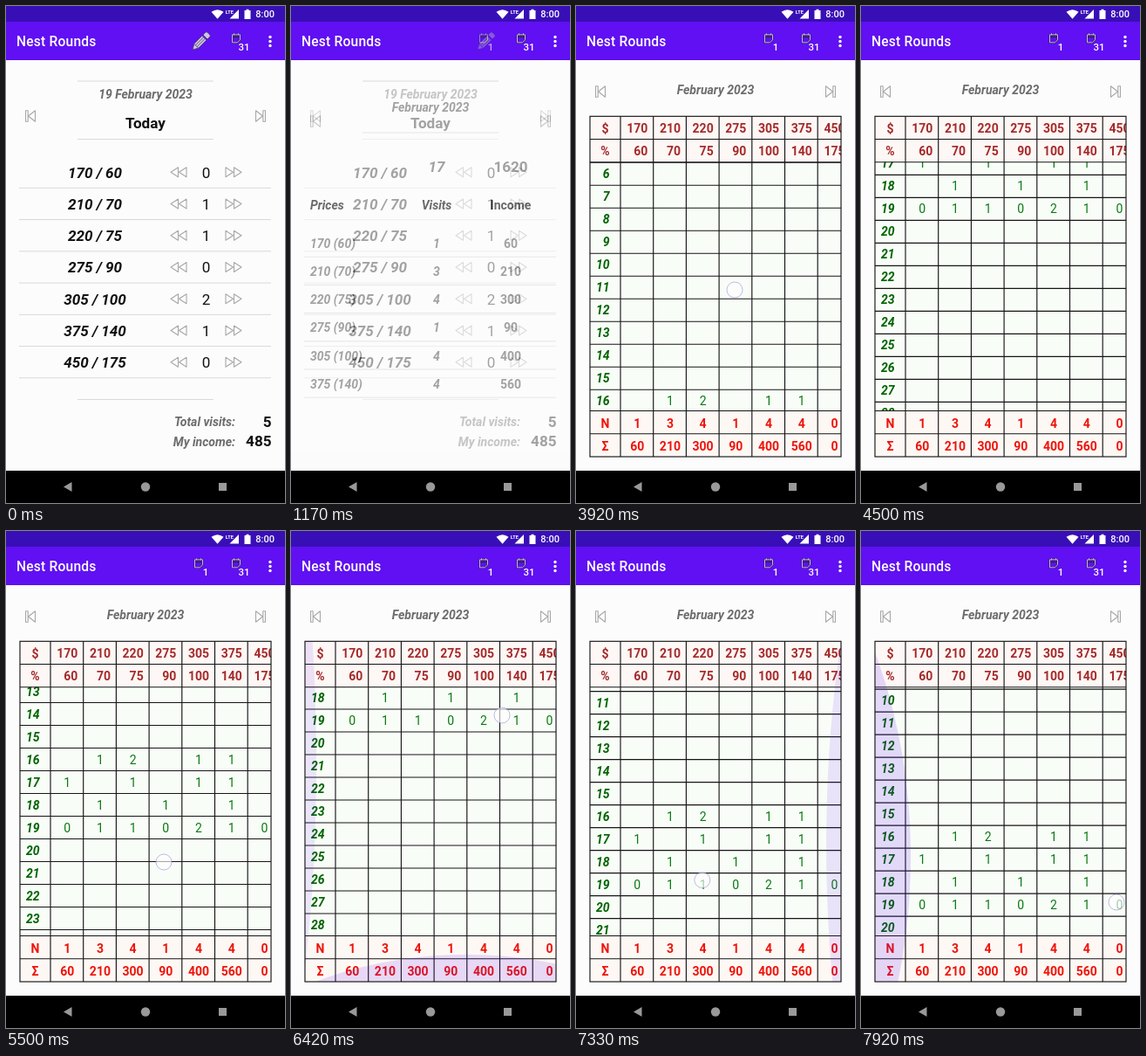
An HTML page that plays this animation: 320x569 px, repeating every 8000 ms.

```html
<!DOCTYPE html>
<html lang="en">
<head>
<meta charset="utf-8">
<title>Visit log</title>
<style>
html, body { margin: 0; width: 100%; height: 100%; overflow: hidden; background: #fcfcfc; }
svg { display: block; width: 100vw; height: 100vh; font: 14px Roboto, sans-serif; }
.b { font-weight: 700; }
.i { font-weight: 700; font-style: italic; }
.l { font-size: 17.1px; }
.m { font-weight: 500; }
.gray { fill: #6c6c6c; }
.dark { fill: #111; }
.brown { fill: #a52a2a; }
.red { fill: #ee1409; }
.green { fill: #0a7a12; }
.deep { fill: #006400; }
.white { fill: #fff; }
.rule { stroke: #d9d9d9; }
.grid { stroke: #151515; stroke-width: 1.15; }
.icon { fill: none; stroke: #a8a8a8; stroke-width: 1.1; stroke-linejoin: round; }
</style>
</head>
<body>
<svg id="stage" viewBox="0 0 320 569" preserveAspectRatio="none">
  <defs>
    <clipPath id="table"><rect x="16" y="126" width="288" height="390"/></clipPath>
    <clipPath id="cols"><rect x="51" y="126" width="253" height="390"/></clipPath>
    <clipPath id="rows"><rect x="16" y="178.5" width="288" height="285"/></clipPath>
    <g id="prev" class="icon">
      <path d="M-5.500-6.300h2.700v12.600h-2.700zM5.500-6.200V6.200L-2.500 0z"/>
    </g>
    <g id="rew" class="icon"><path d="M-.5-5.5v11L-9 0zM9-5.5v11L.5 0z"/></g>
    <g id="cal" fill="none">
      <path d="M-4.5-3.5h9v6l-3 3h-6zM-4.5-1h9M-2.5-5v2M2.5-5v2" stroke="#30244e" stroke-width="1.7"/>
      <path d="M-4.5-3.5h9v6l-3 3h-6zM-2.5-5v2M2.5-5v2" stroke="#c3b6dc"/>
    </g>
  </defs>
</svg>
<script>
const NS = 'http://www.w3.org/2000/svg';
const stage = document.getElementById('stage');

function add(parent, tag, attrs = {}, text) {
  const el = document.createElementNS(NS, tag);
  for (const k in attrs) el.setAttribute(k, attrs[k]);
  if (text !== undefined) el.textContent = text;
  return parent.appendChild(el);
}
const group = (p, attrs) => add(p, 'g', attrs);
const label = (p, x, y, str, cls, anchor = 'middle') =>
  add(p, 'text', { x, y, class: cls, 'text-anchor': anchor }, str);
const line = (p, x1, y1, x2, y2, cls) => add(p, 'line', { x1, y1, x2, y2, class: cls });
const rect = (p, x, y, width, height, fill) => add(p, 'rect', { x, y, width, height, fill });
const use = (p, id, x, y, flip) =>
  add(p, 'use', { href: '#' + id, transform: `translate(${x} ${y})${flip ? ' scale(-1 1)' : ''}` });

const prices = [170, 210, 220, 275, 305, 375, 450];
const shares = [60, 70, 75, 90, 100, 140, 175];
const visits = [1, 3, 4, 1, 4, 4, 0];
const today = [0, 1, 1, 0, 2, 1, 0];

function calendar(g, x, num) {
  use(g, 'cal', x, 36.3);
  label(g, x + (num > 9 ? 9 : 8), 51, num, 'm white').style.fontSize = '11.5px';
}
function screen(arrowY) {
  const g = group(stage);
  rect(g, 0, 62, 320, 470, '#fcfcfc');
  rect(g, 0, 18, 320, 44, '#6010f2');
  use(g, 'prev', 28, arrowY);
  use(g, 'prev', 292, arrowY, true);
  calendar(g, 264, 31);
  return g;
}

function dayScreen() {
  const g = screen(126);
  const pen = group(g, { transform: 'translate(214 50) rotate(-45)', stroke: '#4a3c68', 'stroke-width': .8 });
  add(pen, 'path', { d: 'M0 0l6-3.5h13v7h-13z', fill: '#cfc4e6' });
  add(pen, 'path', { d: 'M20.5-3.5h4q1.5 0 1.5 1.5v4q0 1.5-1.5 1.5h-4z', fill: '#cfc4e6' });
  add(pen, 'path', { d: 'M6-1.2h13M6 1.2h13M6-3.5v7', fill: 'none' });
  for (const y of [86, 152.5, 450.5]) line(g, 82, y, 238, y, 'rule');
  label(g, 160, 105.5, '19 February 2023', 'i gray');
  label(g, 160, 139.5, 'Today', 'b l dark');
  prices.forEach((p, k) => {
    const y = 190.3 + 36.25 * k;
    label(g, 102, y + 6.2, `${p} / ${shares[k]}`, 'i l dark');
    use(g, 'rew', 198, y);
    label(g, 229.5, y + 6.2, today[k], 'l dark');
    use(g, 'rew', 261, y, true);
    line(g, 15, y + 18, 304, y + 18, 'rule');
  });
  label(g, 263, 481, 'Total visits:', 'i gray', 'end');
  label(g, 304.5, 481.5, '5', 'b l dark', 'end');
  label(g, 263, 503.5, 'My income:', 'i gray', 'end');
  label(g, 304.5, 504, '485', 'b l dark', 'end');
  return g;
}

function sumScreen() {
  const g = screen(132);
  calendar(g, 221, 1);
  for (const y of [86, 145]) line(g, 82, y, 238, y, 'rule');
  label(g, 160, 121, 'February 2023', 'i gray');
  label(g, 167, 189.5, '17', 'i l gray');
  label(g, 252, 189.5, '1620', 'b l gray');
  label(g, 22, 233, 'Prices', 'i dark', 'start');
  label(g, 167, 233, 'Visits', 'i dark');
  label(g, 252, 233, 'Income', 'b dark');
  for (let k = 0; k < 6; k++) {
    const y = 276.7 + 32.2 * k;
    label(g, 22, y, `${prices[k]} (${shares[k]})`, 'i gray', 'start');
    label(g, 167, y, visits[k], 'i gray');
    label(g, 252, y, visits[k] * shares[k], 'b gray');
    line(g, 15, y + 10.5, 304, y + 10.5, 'rule');
  }
  return g;
}

const COL = 37.7, ROW = 26, MAX_Y = 444, MAX_X = 10.9;
const colX = k => 51 + COL * k;
let dayNames, dayCells, columns, glowLeft, glowRight, glowBottom;

function tableScreen() {
  const g = screen(98);
  calendar(g, 221, 1);
  label(g, 160, 101, 'February 2023', 'i gray');
  rect(g, 16, 126, 288, 53, '#fdf7f5');
  rect(g, 16, 179, 288, 285, '#f9fdf8');
  rect(g, 16, 464, 288, 52, '#fef8f5');

  const body = group(g, { 'clip-path': 'url(#rows)' });
  dayNames = group(body);
  dayCells = group(group(body, { 'clip-path': 'url(#cols)' }));
  for (let d = 1; d <= 28; d++) {
    const y = 180 + ROW * (d - 1);
    label(dayNames, 38.5, y + 18, d, 'i deep', 'end');
    line(dayNames, 16, y, 304, y, 'grid');
  }
  const log = { 16: ' 12 11 ', 17: '1 1 11 ', 18: ' 1 1 1 ', 19: today.join('') };
  for (const d in log) [...log[d]].forEach((v, k) => {
    if (v !== ' ') label(dayCells, colX(k) + 19.2, 198 + ROW * (d - 1), v, 'green');
  });

  columns = group(group(g, { 'clip-path': 'url(#cols)' }));
  prices.forEach((p, k) => {
    const x = colX(k), mid = x + 19.2;
    label(columns, x + 31.3, 145, p, 'b brown', 'end');
    label(columns, x + 31.3, 171, shares[k], 'b brown', 'end');
    label(columns, mid, 482.5, visits[k], 'b red');
    label(columns, mid, 508.5, visits[k] * shares[k], 'b red');
    if (k) line(columns, x, 126, x, 516, 'grid');
  });
  label(g, 33.5, 145, '$', 'b brown');
  label(g, 33.5, 171, '%', 'b brown');
  label(g, 33.5, 482.5, 'N', 'b red');
  label(g, 33.5, 508.5, 'Σ', 'b red');
  for (const y of [152.5, 178.7, 463.5, 489.7]) line(g, 16, y, 304, y, 'grid');
  line(g, 51, 126, 51, 516, 'grid');

  const glows = group(g, { 'clip-path': 'url(#table)', fill: '#5a10ee' });
  [glowLeft, glowRight, glowBottom] = [0, 1, 2].map(() => add(glows, 'ellipse'));
  add(g, 'rect', { x: 16, y: 126.3, width: 288, height: 389.7, fill: 'none', class: 'grid' });
  return g;
}

const day = dayScreen(), sum = sumScreen(), table = tableScreen();

function systemBars() {
  const g = group(stage);
  rect(g, 0, 0, 320, 18, '#380fb6');
  rect(g, 0, 532, 320, 37, '#000');
  label(g, 12, 46, 'Nest Rounds', 'm white', 'start').style.cssText = 'font-size:15.6px;letter-spacing:.2px';
  for (const cy of [35.5, 40.5, 45.5]) add(g, 'circle', { cx: 303, cy, r: 1.7, class: 'white' });
  add(g, 'path', { d: 'M235.5 6.8q7-5 14 0l-7 8z', class: 'white' });
  label(g, 256.3, 9, 'LTE', 'b white').style.fontSize = '5.6px';
  add(g, 'path', { d: 'M267 4v10.5h-10.5z', class: 'white' });
  add(g, 'path', { d: 'M273.5 5h2v-1.2h3v1.2h2v10h-7z', class: 'white' });
  label(g, 308, 13.2, '8:00', 'm white', 'end').style.fontSize = '11px';
  const nav = group(g, { fill: '#999' });
  add(nav, 'path', { d: 'M75.5 545v11l-9.5-5.5z' });
  add(nav, 'circle', { cx: 160, cy: 550.5, r: 5.2 });
  rect(nav, 244, 546, 9, 9, '#999');
}
systemBars();

const finger = add(stage, 'circle', {
  r: 9, fill: '#fff', 'fill-opacity': .62, stroke: '#8078d0', 'stroke-opacity': .5, 'stroke-width': 1
});

const clamp = (v, lo, hi) => Math.max(lo, Math.min(hi, v));
const ramp = (t, a, b) => clamp((t - a) / (b - a), 0, 1);

// Smooth curve through keys [time, x, y]; col picks the value.
function curve(keys, t, col) {
  const n = keys.length - 1;
  t = clamp(t, keys[0][0], keys[n][0]);
  let k = 0;
  while (k < n - 1 && t > keys[k + 1][0]) k++;
  const slope = j => {
    const a = keys[Math.max(0, j - 1)], b = keys[Math.min(n, j + 1)];
    return (b[col] - a[col]) / (b[0] - a[0]);
  };
  const [a, b] = [keys[k], keys[k + 1]], w = b[0] - a[0], u = (t - a[0]) / w, v = 1 - u;
  return a[col] * v * v * (1 + 2 * u) + b[col] * u * u * (3 - 2 * u)
    + w * u * v * (slope(k) * v - slope(k + 1) * u);
}
function linear(keys, t) {
  for (let k = 1; k < keys.length; k++) {
    const [a, p] = keys[k - 1], [b, q] = keys[k];
    if (t <= b) return p + (q - p) * ramp(t, a, b);
  }
  return keys[keys.length - 1][1];
}

const swipe = [[3670, 182, 461], [3920, 182, 325], [4120, 184, 225]];
const drag = [
  [5170, 182, 253], [5330, 182, 308], [5500, 181, 379], [5670, 184, 422],
  [5840, 200, 398], [6000, 224, 326], [6220, 248, 235], [6420, 242, 211],
  [6600, 205, 264], [6830, 153, 366], [6980, 128, 413], [7150, 122, 418],
  [7400, 160, 395], [7700, 258, 405], [7920, 293, 425]
];
const pullLeft = [[6000, 0], [6250, 14], [6420, 13], [6600, 0], [7400, 0], [7680, 30], [7920, 41]];
const pullRight = [[6500, 0], [6830, 37], [7050, 41], [7250, 32], [7420, 0]];
const pullBottom = [[6130, 0], [6300, 27], [6420, 31], [6560, 12], [6650, 0]];

// The content trails the finger by LAG ms.
const LAG = 10;
function scrollTop(t) {
  if (t < 3670) return 0;
  if (t < 4120) return swipe[0][2] - curve(swipe, t - LAG, 2);
  if (t < 5170) {
    const from = swipe[0][2] - curve(swipe, 4120 - LAG, 2);
    return from + (MAX_Y - from) * (1 - (1 - ramp(t, 4120, 4640)) ** 2);
  }
  return Math.min(MAX_Y, (t < 6420 ? 697 : 657) - curve(drag, t - LAG, 2));
}
function scrollLeft(t) {
  if (t < 6300) return 0;
  return clamp((t < 7150 ? 242 : 122 + MAX_X) - curve(drag, t, 1), 0, MAX_X);
}

// Overscroll bulge: a flattened circle reaching `depth` in from one edge.
function glow(el, depth, size, at, place) {
  const r = 1.2 * size, k = depth / (r * (1 - Math.cos(Math.PI / 6)));
  const [cx, cy, rx, ry] = place(k * r - depth, at, k * r, r);
  const attrs = { cx, cy, rx, ry, opacity: depth > .1 ? .07 + .08 * Math.min(1, depth / 37) : 0 };
  for (const n in attrs) el.setAttribute(n, attrs[n]);
}

function touch(t) {
  if (t >= 920 && t < 1170 || t >= 2500 && t < 2670) return [268, 43];
  if (t >= 3670 && t < 4150) return [curve(swipe, t, 1), curve(swipe, t, 2)];
  if (t >= 5170) return [curve(drag, t, 1), curve(drag, t, 2)];
}

function show(el, alpha) {
  el.style.display = alpha > 0 ? '' : 'none';
  el.style.opacity = alpha;
}

function draw(now) {
  const t = now % 8000;
  const toSum = ramp(t, 1040, 1250), toTable = ramp(t, 2620, 2830);
  show(day, toSum < 1 ? 1 : 0);
  show(sum, toTable < 1 ? toSum : 0);
  show(table, toTable);

  const x = scrollLeft(t), y = scrollTop(t);
  dayNames.setAttribute('transform', `translate(0 ${-y})`);
  dayCells.setAttribute('transform', `translate(${-x} ${-y})`);
  columns.setAttribute('transform', `translate(${-x} 0)`);

  const spot = touch(t);
  show(finger, spot ? 1 : 0);
  if (spot) {
    finger.setAttribute('cx', spot[0]);
    finger.setAttribute('cy', spot[1]);
  }
  const [fx, fy] = spot || [160, 321];
  const midX = (160 + fx) / 2, midY = (321 + fy) / 2;
  glow(glowLeft, linear(pullLeft, t), 390, midY, (off, at, a, r) => [16 - off, at, a, r]);
  glow(glowRight, linear(pullRight, t), 390, midY, (off, at, a, r) => [304 + off, at, a, r]);
  glow(glowBottom, linear(pullBottom, t), 288, midX, (off, at, a, r) => [at, 516 + off, r, a]);
}

let start;
function tick(now) {
  start ??= now;
  draw(now - start);
  requestAnimationFrame(tick);
}
draw(0);
requestAnimationFrame(tick);
</script>
</body>
</html>
```
